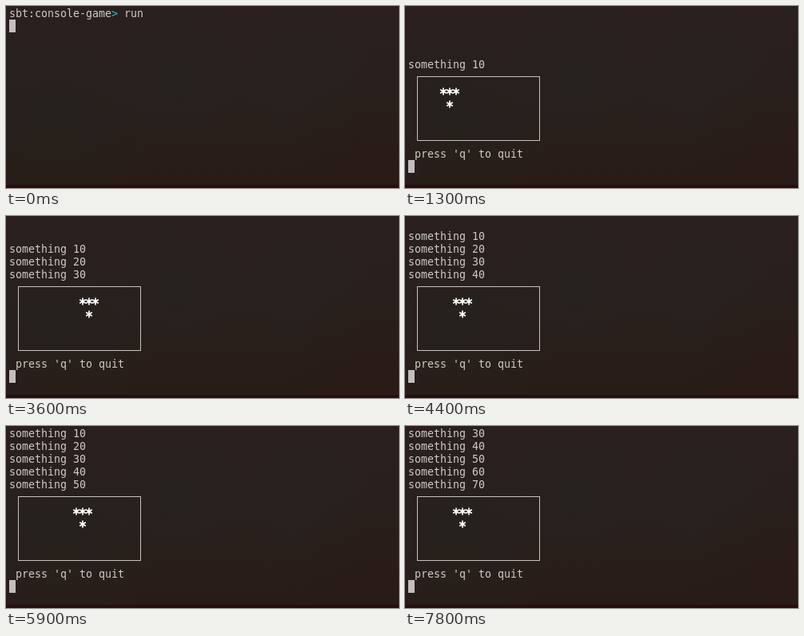
An HTML page with a canvas for the animation above (8000 ms loop, 492 by 228 pixels).

```html
<!DOCTYPE html>
<html lang="en">
<head>
<meta charset="utf-8">
<title>Console game</title>
<style>
  html, body { margin: 0; width: 100%; height: 100%; overflow: hidden; background: #28201d; }
  canvas { display: block; }
</style>
</head>
<body>
<canvas id="stage" width="492" height="228"></canvas>
<script>
const W = 492, H = 228, LOOP = 8000;
const CELL = 8, ROW = 16, LEFT = 4, TOP = 1;
const GAME_START = 300;
const VISIBLE_LINES = 5;

// Times at which a "something N" line is printed
const prints = [1300, 2400, 3400, 4400, 5500, 6500, 7500];

// The piece steps one column at each time; it turns around between runs
const runs = [
  { dir: 1, times: [1800, 2200, 2400, 2500, 2700, 2900, 3100, 3200] },
  { dir: -1, times: [3400, 3600, 3800, 4000, 4200, 4400, 4500, 4700] },
  { dir: 1, times: [5200, 5400, 5500, 5700, 5900, 6100, 6300, 6500] },
  { dir: -1, times: [6800, 7000, 7200, 7400, 7600, 7800] }
];

const ctx = document.getElementById("stage").getContext("2d");
const passed = (times, t) => times.filter(time => time <= t).length;
const colX = col => LEFT + col * CELL;
const rowY = row => TOP + row * ROW;

function glow(x, y, radius, color) {
  const g = ctx.createRadialGradient(x, y, 0, x, y, radius);
  g.addColorStop(0, `rgba(${color},0.55)`);
  g.addColorStop(1, `rgba(${color},0)`);
  ctx.fillStyle = g;
  ctx.fillRect(0, 0, W, H);
}

function background() {
  const g = ctx.createLinearGradient(0, 0, 0, H);
  g.addColorStop(0, "#2a201f");
  g.addColorStop(0.5, "#28201d");
  g.addColorStop(1, "#291c18");
  ctx.fillStyle = g;
  ctx.fillRect(0, 0, W, H);
  glow(60, 150, 130, "36,34,29");
  glow(215, 80, 90, "37,35,30");
  glow(370, 85, 90, "38,34,30");
  glow(470, 190, 120, "42,26,22");
  ctx.fillStyle = "#270d10";
  ctx.fillRect(0, 224, W, 4);
}

function text(str, col, row, color = "#cecbc7") {
  ctx.fillStyle = color;
  ctx.fillText(str, colX(col), rowY(row) + 13);
}

function cursor(row) {
  ctx.fillStyle = "#c1bebe";
  ctx.fillRect(LEFT, rowY(row), CELL, ROW);
}

function star(col, row) {
  const x = colX(col) + CELL / 2, y = rowY(row) + 10;
  ctx.beginPath();
  for (let i = 0; i < 3; i++) {
    const angle = Math.PI / 2 + i * Math.PI / 3;
    const dx = 4.4 * Math.cos(angle), dy = 4.6 * Math.sin(angle);
    ctx.moveTo(x - dx, y - dy);
    ctx.lineTo(x + dx, y + dy);
  }
  ctx.stroke();
}

function prompt() {
  text("sbt:console-game", 0, 0);
  text(">", 16, 0, "#25c4c0");
  text("run", 18, 0);
  cursor(1);
}

function game(t) {
  const count = passed(prints, t);
  for (let i = 0; i < Math.min(count, VISIBLE_LINES); i++) {
    text(`something ${(count - i) * 10}`, 0, 4 - i);
  }

  ctx.strokeStyle = "#c6c3c0";
  ctx.lineWidth = 1;
  ctx.strokeRect(15.5, 88.5, 153, 80);

  const col = runs.reduce((c, run) => c + run.dir * passed(run.times, t), 5);
  ctx.strokeStyle = "#ffffff";
  ctx.lineWidth = 1.7;
  for (let i = 0; i < 3; i++) star(col + i, 6);
  star(col + 1, 7);

  text("press 'q' to quit", 1, 11);
  cursor(12);
}

function draw(t) {
  background();
  ctx.font = '13.3px "DejaVu Sans Mono", monospace';
  if (t < GAME_START) prompt();
  else game(t);
}

let start;
function frame(now) {
  start ??= now;
  draw((now - start) % LOOP);
  requestAnimationFrame(frame);
}
draw(0);
requestAnimationFrame(frame);
</script>
</body>
</html>
```
